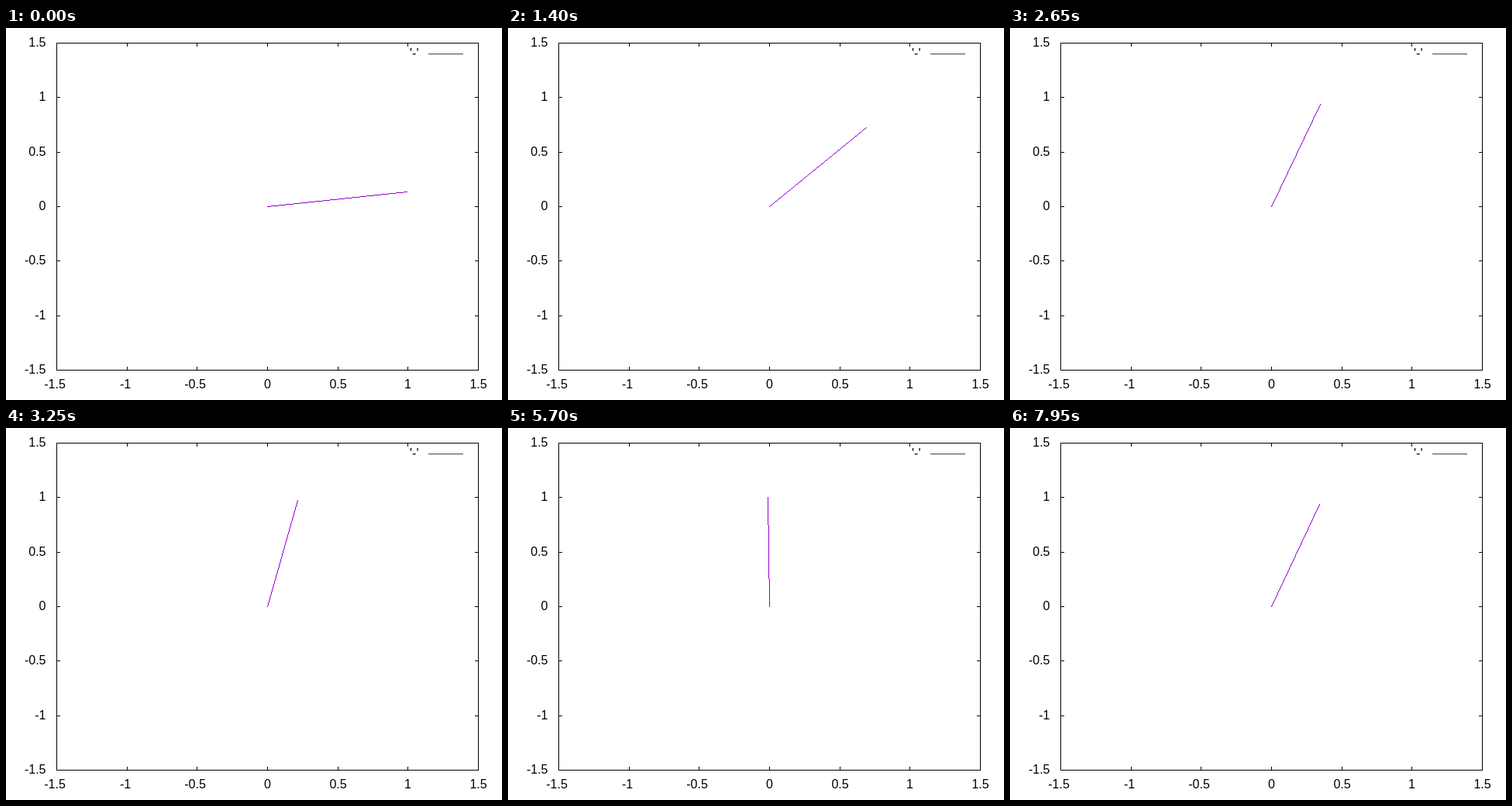
These frames come from a looping animation (640x480 px, 8 s). An HTML page:

```html
<!DOCTYPE html>
<html lang="en">
<head>
<meta charset="utf-8">
<title>Rotating unit vector</title>
<style>
  html, body { margin: 0; width: 100%; height: 100%; overflow: hidden; background: #fff; }
  svg { display: block; }
  text { font: 16px "Liberation Sans", Arial, sans-serif; fill: #000; }
  path { shape-rendering: crispEdges; }
</style>
</head>
<body>
<svg width="640" height="480" viewBox="0 0 640 480">
  <rect width="640" height="480" fill="#fff"/>
  <path id="axes" fill="none" stroke="#000"/>
  <g id="labels"></g>
  <text x="521" y="38">'-'</text>
  <path d="M545 33.5H590" stroke="#444"/>
  <path id="vector" fill="#9400d3"/>
</svg>
<script>
const LOOP = 8000, STEP = 50;
const LEFT = 65, RIGHT = 609, TOP = 19, BOTTOM = 441, TICK = 4;
const CX = (LEFT + RIGHT) / 2, CY = (TOP + BOTTOM) / 2;
const UNIT_X = (RIGHT - LEFT) / 3, UNIT_Y = (BOTTOM - TOP) / 3;

const $ = id => document.getElementById(id);
const px = x => Math.round(CX + x * UNIT_X);
const py = y => CY - Math.round(y * UNIT_Y);

function addLabel(value, x, y, anchor) {
  const text = document.createElementNS("http://www.w3.org/2000/svg", "text");
  text.setAttribute("x", x);
  text.setAttribute("y", y);
  text.setAttribute("text-anchor", anchor);
  text.textContent = value;
  $("labels").append(text);
}

function drawAxes() {
  let d = `M${LEFT + .5} ${TOP + .5}H${RIGHT + .5}V${BOTTOM + .5}H${LEFT + .5}Z`;
  for (let v = -1.5; v <= 1.5; v += .5) {
    const x = px(v), y = py(v);
    if (Math.abs(v) < 1.5) {
      d += `M${x + .5} ${TOP}v${TICK + 1}M${x + .5} ${BOTTOM + 1}v${-TICK - 1}`;
      d += `M${LEFT} ${y + .5}h${TICK + 1}M${RIGHT + 1} ${y + .5}h${-TICK - 1}`;
    }
    addLabel(v, x + (v < 0 ? -2 : .5), 465, "middle");
    addLabel(v, 51.5, y + 5, "end");
  }
  $("axes").setAttribute("d", d);
}

// One-pixel line without smoothing, stepped along its longer axis.
function pixelLine(x0, y0, x1, y1) {
  const dx = x1 - x0, dy = y1 - y0;
  const n = Math.max(Math.abs(dx), Math.abs(dy));
  let d = "";
  for (let i = 0; i <= n; i++) {
    const x = Math.round(x0 + dx * i / n), y = Math.round(y0 + dy * i / n);
    d += `M${x} ${y}h1v1h-1z`;
  }
  return d;
}

// Lean from the vertical in radians: slows, turns just past the top, falls back.
function lean(seconds) {
  const s = seconds - 5.47;
  return s * s / 2 * (.1015 + .005056 * s + .000774 * s * s) - .01636;
}

function render(ms) {
  const t = Math.floor(ms % LOOP / STEP) * STEP;
  const a = lean(t / 1000);
  $("vector").setAttribute("d", pixelLine(CX, CY, px(Math.sin(a)), py(Math.cos(a))));
}

drawAxes();
render(0);
const start = performance.now();
(function tick() {
  render(performance.now() - start);
  requestAnimationFrame(tick);
})();
</script>
</body>
</html>
```
